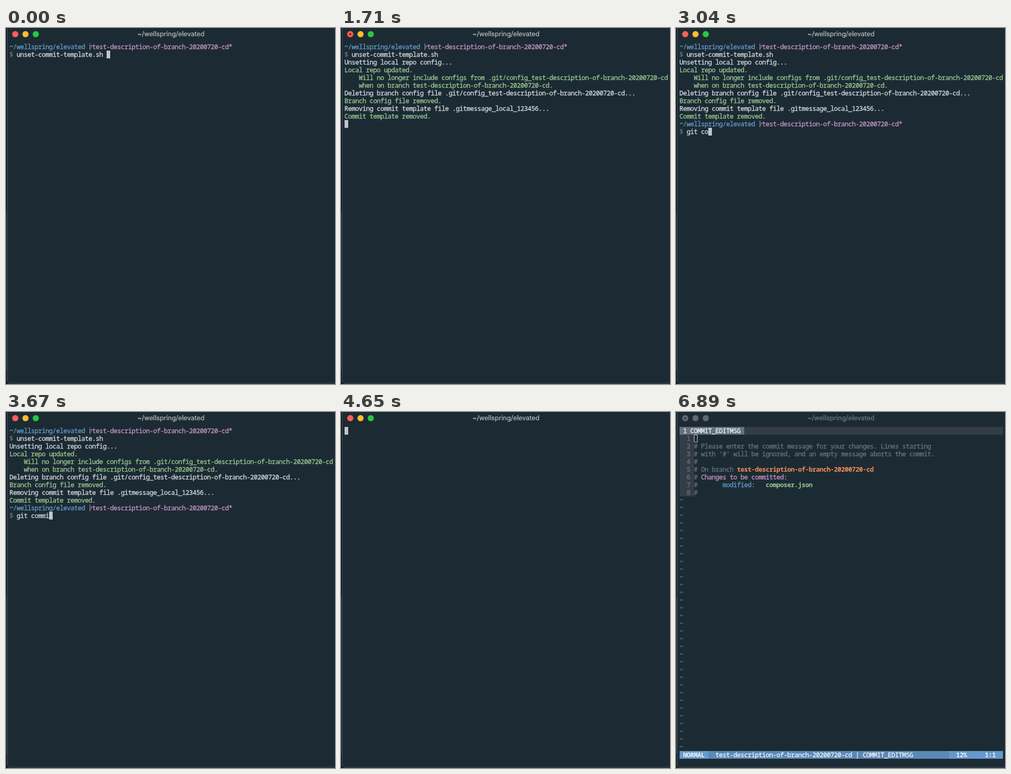
Animation, 641 px wide and 692 px high, one loop 6.97 s. Source, as an HTML page with a canvas:

```html
<!DOCTYPE html>
<html lang="en">
<head>
<meta charset="utf-8">
<title>Terminal</title>
<style>
  html, body { margin: 0; width: 100%; height: 100%; overflow: hidden; background: #1c2b33; }
  canvas { display: block; width: 641px; height: 692px; }
</style>
</head>
<body>
<canvas id="stage" width="641" height="692"></canvas>
<script>
const ctx = document.getElementById('stage').getContext('2d');
const LOOP = 6970;
const CELL_W = 7, CELL_H = 15, LEFT = 7, TOP = 29, BASELINE = 12;
const MONO = '12.4px "Noto Sans Mono", "DejaVu Sans Mono", monospace';

const C = {
  bg: '#1c2b33', text: '#d3d8e0', cursor: '#c0c5ce', gray: '#65737e', panel: '#343d46',
  blue: '#6699cc', purple: '#c594c5', green: '#99c794', orange: '#f99157',
  bar: '#5a89b8', white: '#f0f3f6'
};

const BRANCH = 'test-description-of-branch-20200720-cd';
const COMMAND = 'git commit -a';
const KEY_TIMES = [2600, 2690, 2780, 2860, 2950, 3040, 3220, 3310, 3670, 3760, 3850, 4030, 4120];

const OUTPUT = [
  ['Unsetting local repo config...', C.text],
  ['Local repo updated.', C.green],
  ['    Will no longer include configs from .git/config_' + BRANCH, C.green],
  ['    when on branch ' + BRANCH + '.', C.green],
  ['Deleting branch config file .git/config_' + BRANCH + '...', C.text],
  ['Branch config file removed.', C.green],
  ['Removing commit template file .gitmessage_local_123456...', C.text],
  ['Commit template removed.', C.green]
];

const colX = col => LEFT + col * CELL_W;
const rowY = row => TOP + row * CELL_H;

function rect(x, y, w, h, color) {
  ctx.fillStyle = color;
  ctx.fillRect(x, y, w, h);
}

function disc(x, y, r, color) {
  ctx.fillStyle = color;
  ctx.beginPath();
  ctx.arc(x, y, r, 0, Math.PI * 2);
  ctx.fill();
}

function fillCells(row, col, count, color) {
  rect(colX(col), rowY(row), count * CELL_W, CELL_H, color);
}

// Text with a thin outline, for a medium weight
function inkText(text, x, y, color, weight) {
  ctx.textAlign = 'center';
  ctx.fillStyle = ctx.strokeStyle = color;
  ctx.lineWidth = weight;
  ctx.lineJoin = 'round';
  ctx.fillText(text, x, y);
  if (weight) ctx.strokeText(text, x, y);
}

// One glyph per terminal cell
function write(row, col, text, color, bold) {
  ctx.font = (bold ? 'bold ' : '') + MONO;
  [...text].forEach((ch, i) => {
    if (ch !== ' ') inkText(ch, colX(col + i) + CELL_W / 2, rowY(row) + BASELINE, color, bold ? 0 : 0.35);
  });
}

function cursor(row, col, hollow) {
  if (!hollow) return fillCells(row, col, 1, C.cursor);
  ctx.strokeStyle = C.cursor;
  ctx.lineWidth = 1;
  ctx.strokeRect(colX(col) + 0.5, rowY(row) + 0.5, CELL_W - 1, CELL_H - 1);
}

function drawWindow(active, hover) {
  rect(0, 0, 641, 692, active ? '#0f1820' : '#17212a');
  rect(0, 360, 1, 304, active ? '#38424a' : '#434d55');
  ctx.beginPath();
  ctx.moveTo(2.5, -1);
  ctx.lineTo(2.5, 685);
  ctx.quadraticCurveTo(2.5, 690.5, 8, 690.5);
  ctx.lineTo(642, 690.5);
  ctx.lineTo(642, -1);
  ctx.fillStyle = C.bg;
  ctx.fill();
  ctx.strokeStyle = '#4a5860';
  ctx.lineWidth = 1;
  ctx.stroke();

  const lights = active ? ['#ff5f57', '#febc2e', '#28c840'] : ['#5f6a70', '#5f6a70', '#5f6a70'];
  lights.forEach((color, i) => disc(18 + i * 20, 12, 6, color));
  if (hover) disc(18, 12, 2, active ? '#7a0d0a' : '#27343b');

  ctx.font = '12.75px Inter, "Liberation Sans", sans-serif';
  inkText('~/wellspring/elevated', 321.5, 16, active ? '#bdc3c5' : '#737e83', 0.2);
}

function drawPrompt(row, command) {
  write(row, 0, '~/wellspring/elevated', C.blue);
  const x = colX(22), y = rowY(row);
  rect(x + 2, y + 1, 1, 13, C.purple);
  ctx.strokeStyle = C.purple;
  ctx.lineWidth = 1;
  ctx.beginPath();
  ctx.moveTo(x + 3, y + 11);
  ctx.lineTo(x + 5.5, y + 7.5);
  ctx.lineTo(x + 5.5, y + 5.5);
  ctx.moveTo(x + 4, y + 5.5);
  ctx.lineTo(x + 7, y + 5.5);
  ctx.stroke();
  write(row, 23, BRANCH + '*', C.purple);
  write(row + 1, 0, '$', C.gray);
  write(row + 1, 2, command, C.text);
}

function drawShell(t) {
  drawPrompt(0, 'unset-commit-template.sh');
  if (t < 1440) return cursor(1, 27);
  if (t < 1710) return cursor(2, 0);
  OUTPUT.forEach(([text, color], i) => write(2 + i, 0, text, color));
  if (t < 1980) return cursor(10, 0);
  const typed = KEY_TIMES.filter(k => k <= t).length;
  drawPrompt(10, COMMAND.slice(0, typed));
  if (t < 4290) return cursor(11, 2 + typed);
  if (t < 4470) return cursor(12, 0);
  write(12, 0, '8fe73f50e8f3532caac2b24a4a01a79d71e6600e', C.text);
  cursor(13, 0);
}

function drawEditor(active) {
  fillCells(0, 0, 90, C.panel);
  fillCells(0, 0, 18, C.gray);
  write(0, 1, '1 COMMIT_EDITMSG', C.white);

  fillCells(1, 0, 4, C.panel);
  write(1, 2, '1', C.gray);
  const lines = [
    '# Please enter the commit message for your changes. Lines starting',
    "# with '#' will be ignored, and an empty message aborts the commit.",
    '#', '# On branch', '#', '#', '#'
  ];
  lines.forEach((text, i) => {
    fillCells(i + 2, 0, 4, C.panel);
    write(i + 2, 2, String(i + 2), C.gray);
    write(i + 2, 4, text, C.gray);
  });
  write(5, 16, BRANCH, C.orange, true);
  write(6, 6, 'Changes to be committed:', C.purple);
  write(7, 12, 'modified:', C.blue);
  write(7, 24, 'composer.json', C.green, true);
  for (let row = 9; row < 42; row++) write(row, 0, '~', C.gray);

  fillCells(42, 0, 90, C.blue);
  fillCells(42, 8, 67, C.bar);
  write(42, 1, 'NORMAL', C.white, true);
  write(42, 10, BRANCH + ' | COMMIT_EDITMSG', C.white);
  write(42, 77, '12%', C.white, true);
  write(42, 85, '1:1', C.white, true);
  cursor(1, 4, !active);
}

function draw(t) {
  const active = t < 6890;
  const hover = (t >= 1440 && t < 2860) || t >= 4820;
  drawWindow(active, hover);
  if (t < 4650) drawShell(t);
  else if (t < 4820) cursor(0, 0);
  else drawEditor(active);
}

const start = performance.now();
function tick() {
  draw((performance.now() - start) % LOOP);
  requestAnimationFrame(tick);
}
tick();
</script>
</body>
</html>
```
